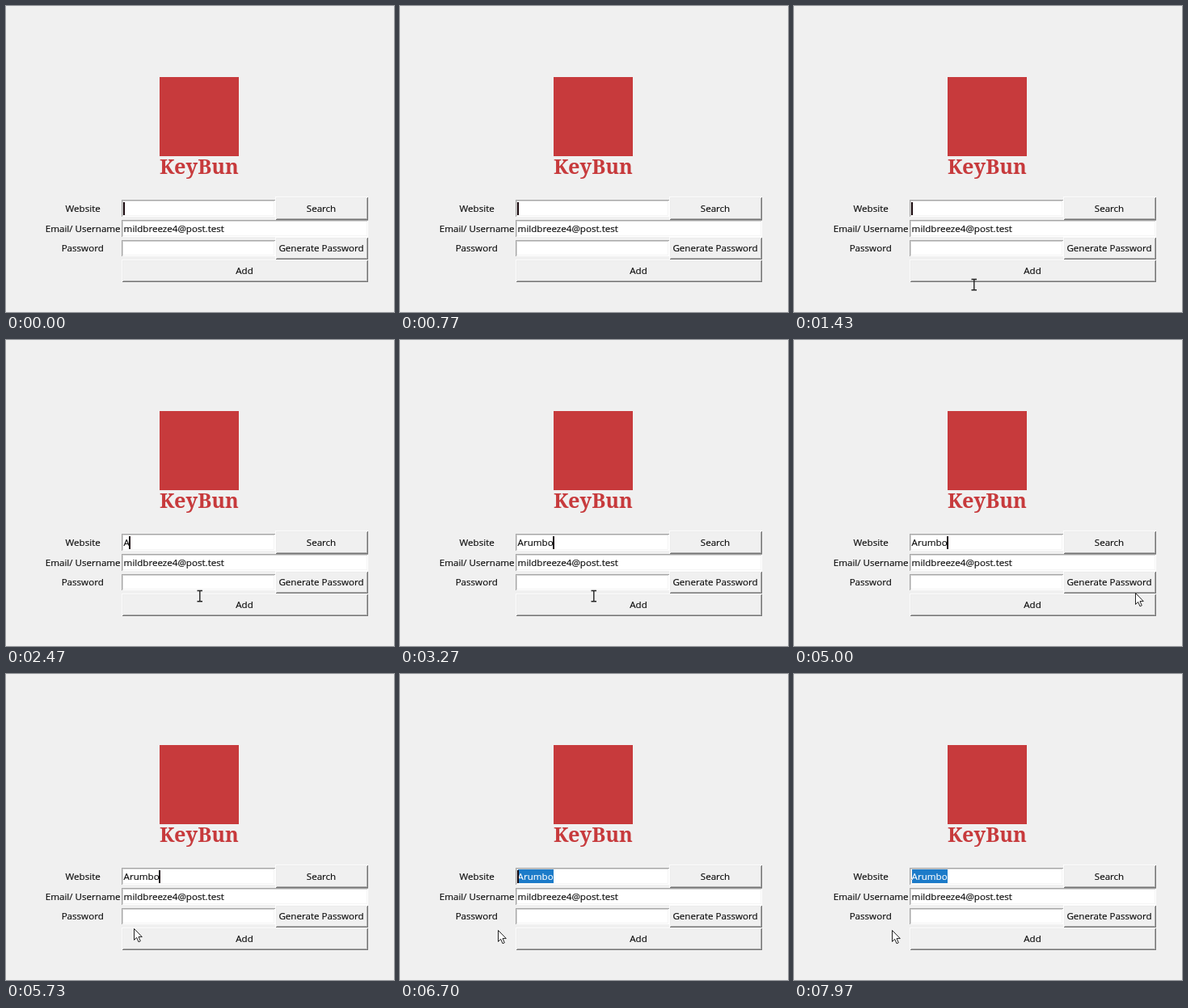
Animation of 480 by 379 pixels, one loop 8 s. Source, as an HTML page:

```html
<!DOCTYPE html>
<html lang="en">
<head>
<meta charset="utf-8">
<title>Password form</title>
<style>
  html, body { margin: 0; width: 100%; height: 100%; overflow: hidden; background: #f0f0f0; }
  svg { display: block; width: 100%; height: 100%; }
  text { font: 11.6px "Open Sans", "Noto Sans", sans-serif; fill: #0a0a0a; stroke: #0a0a0a; stroke-width: .15; }
  .mid { text-anchor: middle; }
  .title { font: 900 25.3px "Noto Serif", "Liberation Serif", serif; fill: #c73a3c; stroke: none; }
  .white { fill: #fff; stroke: #fff; }
  .line { fill: none; stroke-width: 1; shape-rendering: crispEdges; }
  rect { shape-rendering: crispEdges; }
</style>
</head>
<body>
<svg viewBox="0 0 480 379">
  <defs><clipPath id="selClip"><rect id="clipBox" y="242" height="17"/></clipPath></defs>
  <rect width="480" height="379" fill="#f0f0f0"/>
  <rect x="190" y="88" width="98" height="98" fill="#c73a3c"/>
  <text class="title mid" x="239" y="208">KeyBun</text>
  <g id="form"></g>
  <text id="site" x="145.6" y="254.7"></text>
  <rect id="sel" y="242" height="17" fill="#1c7bc9"/>
  <g clip-path="url(#selClip)"><text id="siteSel" class="white" x="145.6" y="254.7"></text></g>
  <rect id="caret" y="243" width="2" height="16" fill="#1a0a0e"/>
  <g id="cursor">
    <path id="beam" fill="none" stroke="#222" stroke-width="1.4" d="M-3.5 -6.5H3M-.2 -6.5V6.7M-3.5 6.7H3"/>
    <path id="arrow" fill="#fff" stroke="#222" stroke-width="1" stroke-linejoin="round"
          d="M.5 .5V14.5L3.7 11.4L6 16.8L8.3 15.8L6 10.6H10.3Z"/>
  </g>
</svg>
<script>
const LOOP = 8000;
const WORD = "Arumbo";
const KEYS = [2430, 2600, 2750, 2900, 3040, 3170];
// Moments that restart the caret blink
const BLINKS = [-500, ...KEYS, 5730, 6430];
const DRAG = [5850, 6400];
// Pointer path: time, x, y
const PATH = [
  [700, 215, 392], [930, 218, 371], [1300, 223, 345], [1600, 223, 345],
  [1760, 227, 332], [2050, 240, 317], [4030, 240, 317], [4170, 317, 312],
  [4360, 470, 314], [4600, 424, 313], [4970, 424, 313], [5540, 158, 315],
  [DRAG[0], 158, 315], [DRAG[1], 121, 317]
];
const $ = id => document.getElementById(id);

function box(x, y, w, h, raised) {
  const r = x + w, b = y + h;
  const edge = (color, d) => `<path class="line" stroke="${color}" d="${d}"/>`;
  const topLeft = i => `M${x + i} ${b - i}V${y + i}H${r - i}`;
  const lowRight = i => `M${x + i} ${b - i}H${r - i}V${y + i}`;
  const [tl0, tl1, br0, br1] = raised
    ? ["#fcfcfc", "#ececec", "#747474", "#acacac"]
    : ["#a6a6a6", "#d4d4d4", "#fff", "#f4f4f4"];
  return `<rect x="${x}" y="${y}" width="${w}" height="${h}" fill="${raised ? "#f0f0f0" : "#fff"}"/>` +
    edge(tl1, topLeft(1.5)) + edge(br1, lowRight(1.5)) +
    edge(tl0, topLeft(.5)) + edge(br0, lowRight(.5));
}
const label = (s, x, y) => `<text class="mid" x="${x}" y="${y}">${s}</text>`;
const button = (s, x, y, w, h) => box(x, y, w, h, true) + label(s, x + w / 2 - .5, y + h / 2 + 4);

$("form").innerHTML =
  label("Website", 95.2, 254.7) + label("Email/ Username", 95.2, 279.7) + label("Password", 94.7, 304) +
  box(143, 240, 190, 21) + box(143, 265, 305, 21) + box(143, 290, 190, 20) +
  `<text x="145.6" y="279.7">mildbreeze4@post.test</text>` +
  button("Search", 333, 236, 115, 29) +
  button("Generate Password", 333, 286, 115, 28) +
  button("Add", 143, 314, 305, 28);

const ease = p => p * p * (3 - 2 * p);

function pointerAt(t) {
  const i = PATH.findIndex(k => k[0] > t);
  if (i === 0) return PATH[0].slice(1);
  if (i < 0) return PATH[PATH.length - 1].slice(1);
  const [t0, x0, y0] = PATH[i - 1], [t1, x1, y1] = PATH[i];
  const p = ease((t - t0) / (t1 - t0));
  return [x0 + (x1 - x0) * p, y0 + (y1 - y0) * p];
}

function caretOn(t) {
  const start = BLINKS.filter(b => b <= t).pop();
  return (t - start) % 900 < 600;
}

function render(t) {
  const typed = KEYS.filter(k => k <= t).length;
  $("site").textContent = $("siteSel").textContent = WORD.slice(0, typed);
  const drag = Math.min(1, Math.max(0, (t - DRAG[0]) / (DRAG[1] - DRAG[0])));
  const at = Math.round(typed * (1 - ease(drag)));
  const widthTo = n => n ? $("site").getSubStringLength(0, n) : 0;
  const left = widthTo(at), full = widthTo(typed);
  for (const id of ["sel", "clipBox"]) {
    $(id).setAttribute("x", 145.6 + left);
    $(id).setAttribute("width", full - left);
  }
  $("caret").setAttribute("x", Math.round(144.6 + left));
  $("caret").style.display = caretOn(t) ? "" : "none";

  const [x, y] = pointerAt(t).map(Math.round);
  $("cursor").setAttribute("transform", `translate(${x} ${y})`);
  const beam = t < 4260;
  $("beam").style.display = beam ? "" : "none";
  $("arrow").style.display = beam ? "none" : "";
}

const start = performance.now();
function tick() {
  render((performance.now() - start) % LOOP);
  requestAnimationFrame(tick);
}
tick();
</script>
</body>
</html>
```
